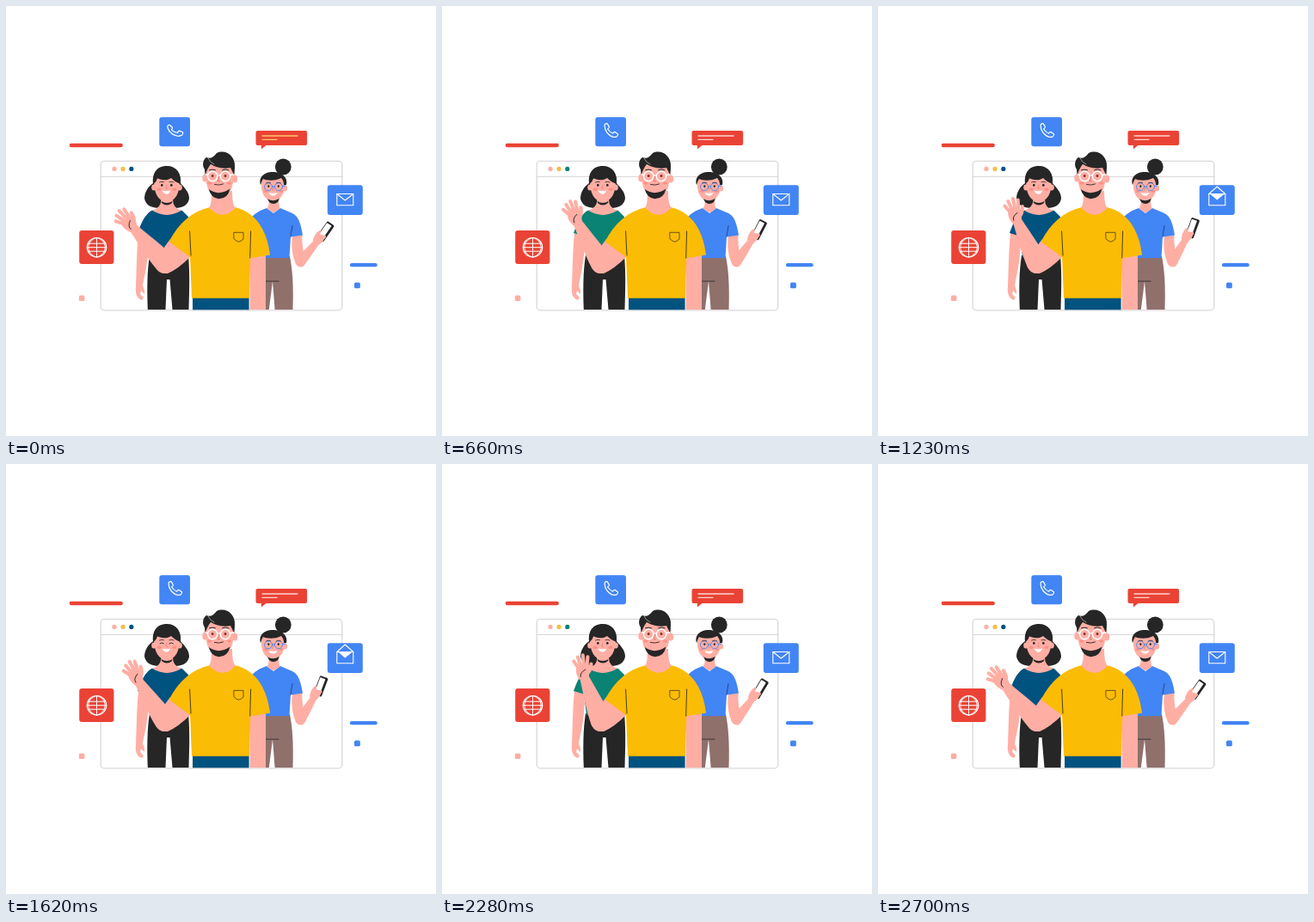
Recreate the animation shown at these times as an HTML page with a canvas. Size 500 px wide and 500 px high, loop 2730 ms.

```html
<!DOCTYPE html>
<html lang="en">
<head>
<meta charset="utf-8">
<title>Team greeting</title>
<style>
html, body { margin: 0; width: 100%; height: 100%; overflow: hidden; background: #fff; }
canvas { display: block; width: 500px; height: 500px; }
</style>
</head>
<body>
<canvas id="stage" width="500" height="500"></canvas>
<script>
const ctx = document.getElementById('stage').getContext('2d');
const LOOP = 2730;
const TAU = Math.PI * 2;
const RED = '#ea4335', BLUE = '#4285f4', YELLOW = '#fbbc05', NAVY = '#00527f', TEAL = '#0a8375';
const SKIN = '#ffaea4', INK = '#262626', BROWN = '#8f706b', GREY = '#dcd8da', BLUSH = '#ff8f86';

const clamp = v => Math.max(0, Math.min(1, v));
const ease = v => { v = clamp(v); return v * v * (3 - 2 * v); };
const mix = (a, b, k) => a + (b - a) * k;
const sway = (t, period) => (1 - Math.cos(TAU * t / period)) / 2;
const within = (t, a, b) => t >= a && t < b;

function fill(d, color) {
  ctx.fillStyle = color;
  ctx.fill(new Path2D(d));
}
function line(d, color, width = 1) {
  ctx.strokeStyle = color;
  ctx.lineWidth = width;
  ctx.stroke(new Path2D(d));
}
function oval(x, y, rx, ry, color) {
  ctx.beginPath();
  ctx.ellipse(x, y, rx, ry, 0, 0, TAU);
  ctx.fillStyle = color;
  ctx.fill();
}
function ring(x, y, r, color, width = 1) {
  ctx.beginPath();
  ctx.arc(x, y, r, 0, TAU);
  ctx.strokeStyle = color;
  ctx.lineWidth = width;
  ctx.stroke();
}
function box(x, y, w, h, r, color) {
  ctx.beginPath();
  ctx.roundRect(x, y, w, h, r);
  ctx.fillStyle = color;
  ctx.fill();
}
function at(x, y, degrees, draw) {
  ctx.save();
  ctx.translate(x, y);
  ctx.rotate(degrees * Math.PI / 180);
  draw();
  ctx.restore();
}

function drawWindow(accent) {
  ctx.beginPath();
  ctx.roundRect(110.2, 180.3, 280.5, 173.5, 4);
  ctx.strokeStyle = GREY;
  ctx.lineWidth = 1.3;
  ctx.stroke();
  line('M110 198.5H391', GREY, 1.2);
  oval(126, 189.4, 2.6, 2.6, SKIN);
  oval(136, 189.4, 2.6, 2.6, '#f2bf49');
  oval(145.8, 189.4, 2.6, 2.6, accent);
}

function drawPhoneTile(t) {
  box(178.3, 129.2, 35.7, 34, 3, BLUE);
  const ringing = -16 * Math.cos(TAU * t / 240) * clamp(1 - t / 570);
  at(196.6, 144.5, ringing, () => line(
    'M-7.5-5Q-7.6-8-4.6-7.8L-2.2-4.2Q-2-3-4-1.5Q-1.8 2 2 3.7Q3.2 1.7 4.6 2L8 4.6' +
    'Q8.2 6 6.2 7.6Q1 9.3-4.5 3Q-7.5-1-7.5-5Z', '#fff', 1.2));
}

function drawMailTile(t) {
  box(373.8, 208.2, 41, 34.8, 3, BLUE);
  const open = ease((t - 950) / 160) * (1 - ease((t - 1950) / 160));
  const tip = mix(226, 210, open);
  if (open > 0.5) fill('M386 218.5L394.3 225.5 402.8 218.5Z', '#fff');
  line('M384.8 218.5H403.8V231.8H384.8Z', '#fff', 1.1);
  line(`M384.8 218.5L394.3 ${tip} 403.8 218.5`, '#fff', 1.1);
}

function drawGlobeTile(t) {
  box(85.2, 261, 40.2, 39, 3, RED);
  const r = 11.2, turn = 120 * clamp(t / 570);
  ctx.save();
  ctx.translate(105.5, 280.7);
  ring(0, 0, r, '#fff', 1.2);
  for (let i = 0; i < 3; i++) {
    const lon = (30 + i * 60 + turn) % 180 - 90;
    const bulge = r * Math.sin(lon * Math.PI / 180) * 4 / 3;
    line(`M0 ${-r}C${bulge} ${-r * 0.75} ${bulge} ${r * 0.75} 0 ${r}`, '#fff');
  }
  line('M-10.2-4.5H10.2M-11.2 0H11.2M-10.2 4.5H10.2', '#fff');
  ctx.restore();
}

function drawBubble(t) {
  box(290.5, 145, 59.6, 17, 2, RED);
  fill('M296.8 161V166.6L303 161.5Z', RED);
  const ink = t < 30 ? '#ffc66b' : '#ffd5cf';
  line('M298 151H339', ink, 1.3);
  line('M298 155.3H315', ink, 1.3);
}

function drawAccents() {
  line('M76 162H133.6', RED, 4.6);
  line('M402 301.2H429.6', BLUE, 4.2);
  box(84.8, 336.6, 6.6, 6.4, 1.5, SKIN);
  box(405, 321.6, 6.8, 6.6, 1.5, BLUE);
}

function drawLeftWoman(t, shirt) {
  fill('M187 186C174 186 170 196 171 206C165 210 161 217 161 224C163 234 173 236 185 234.5' +
    'C200 236 211 235 213 224C213 216 207 211 203 206C204 194 198 186 187 186Z', INK);
  fill('M154 264C152 284 152 300 151 326C150 334 152 340 158 342L160 339L156 335L157 331' +
    'L161 335C162 330 159 327 159 324C164 302 166 290 166 264Z', SKIN);
  fill('M167 290H212C214 312 213 334 212.5 353H193.5L190.5 318H187L185.5 353H164.8C164 330 164 308 167 290Z', INK);
  fill('M169 238C161 243 157 253 153 264L165 267.5L168 292H212V245L205 238Q187 234 169 238Z', shirt);
  fill('M170 237.8Q180 235 180.5 225H194Q194 235 204 237.8Q187 248 170 237.8Z', SKIN);
  oval(172, 211, 2.8, 3.5, SKIN);
  oval(202, 211, 2.8, 3.5, SKIN);
  fill('M172 203Q172 226 187 228Q202 226 202 203Q194 197 187 199Q179 198 172 203Z', SKIN);
  fill('M180.5 227Q187 231 193.5 227L193 229Q187 234 181 229Z', INK);
  fill('M171 207C171 192 177 187 187 187C198 187 204 195 203 207C198 205 195 203 192 200C187 204 178 202 176 200Q175 205 171 207Z', INK);
  oval(178, 213.2, 2.5, 1.7, BLUSH);
  oval(196, 213.2, 2.5, 1.7, BLUSH);
  if (within(t, 1560, 1710)) {
    line('M179 208.8Q181.3 206.8 183.5 208.8M190 208.8Q192.3 206.8 194.5 208.8', INK, 0.9);
  } else {
    oval(181.3, 208.3, 1.3, 1.5, INK);
    oval(192.3, 208.3, 1.3, 1.5, INK);
  }
  line('M178.5 205Q181 203.5 183.5 204.7M190 204.7Q193 203.5 195 205', INK, 0.8);
  line('M187 208L185.7 212L187.5 212.3', '#e5786f', 0.7);
  fill('M181.5 214.5Q186.5 216 191 214.5Q190 218.7 186.5 218.7Q183 218.5 181.5 214.5Z', '#fff');
}

function drawPhoneArm(t) {
  const lift = sway(t, LOOP);
  fill('M333 267L344.5 266C344 273 345 281 346 286L349 298Q346 303 340 301.5C334 299 331 281 333 267Z', SKIN);
  at(342, 297, mix(39.6, 30.5, lift), () => {
    fill('M-5.5 1C-5-10-4-21-3-30L4-30C5-20 6-10 6.5 1A6 5 0 0 1-5.5 1Z', SKIN);
    at(0, -45.4, mix(-5, -11, lift), () => {
      box(-4.5, -11.5, 10, 23, 1.5, INK);
      box(-3.7, -9.6, 6.4, 17.5, 0.7, '#fff');
    });
    fill('M-4-28C-7-34-7-40-5-43Q-3-44-2.5-39L4-42Q6-41 5-38C6-36 5-31 4-28Z', SKIN);
  });
}

function drawRightWoman(t) {
  drawPhoneArm(t);
  fill('M300 291H330C333 306 334.5 324 333.5 353H312.6L310 320L305.8 353H300Z', BROWN);
  line('M302.5 320H317', INK, 0.8);
  fill('M303 235C294 238 288 242 284 248V293H329.5L331 268.5L345 266.5C343 255 341 245 333 241L319 235L311 241Z', BLUE);
  line('M333 255.5L331 268', '#243a66', 0.8);
  fill('M303 235.2Q306 234 306 224H317Q317 234 319 235.2L311 240.5Z', SKIN);
  oval(322.3, 187, 9.4, 9.4, INK);
  oval(324.5, 212, 2.6, 3.5, SKIN);
  fill('M296.5 202Q296 226 310.5 227Q325 225 324.5 202Q311 194 296.5 202Z', SKIN);
  fill('M304 224.2Q311 228.5 318 223.8L316 228Q311 232 306 228Z', INK);
  fill('M296 208C293 198 302 192 312 193C322 194 328 200 326 208L323 208Q323 203 320 200C312 204 303 203 299 201Q297 204 296 208Z', INK);
  oval(301.8, 215.6, 2.3, 1.4, BLUSH);
  oval(320, 215.6, 2.3, 1.4, BLUSH);
  ring(305, 210.3, 4.5, BLUE, 0.9);
  ring(317, 210.3, 4.5, BLUE, 0.9);
  line('M309.5 210Q311 209 312.5 210M321.5 209.3L325 209', BLUE, 0.9);
  oval(305.3, 209.6, 1.1, 1.3, INK);
  oval(316.8, 209.6, 1.1, 1.3, INK);
  line('M302.5 205.8Q305 204.5 307.5 205.6M314.5 205.6Q317 204.5 319.5 205.8', INK, 0.7);
  line('M311 210.5L310 214.5', '#e5786f', 0.7);
  fill('M305.5 217Q311 218.5 315.5 217Q314 220.7 310.5 220.6Q307 220.5 305.5 217Z', '#fff');
}

function drawHand(turn) {
  at(0, -58, turn, () => {
    fill('M-5 5C-8 0-9-6-7-11Q0-16 7-11Q9-3 5 5Z', SKIN);
    line('M-5.5-9L-10-16.5M-2.5-11L-5-21M1.5-11L1-23M5-10L6.5-20.5', SKIN, 4);
    line('M4-1Q9-4 10-12', SKIN, 4.2);
    line('M-3 2Q-4-3 3-6', INK, 0.9);
  });
}

function drawWavingArm(t) {
  const raise = sway(t, 910);
  fill('M191 271L215 291Q200 306 188 311Q176 312 173 301Q180 285 191 271Z', SKIN);
  at(184.5, 299.5, mix(-41.5, -20.5, raise), () => {
    fill('M-11.5 0C-11-20-7-40-4.5-60H4.8C7-44 11-22 13-6Q12 8 2 11.5Q-10 12-11.5 0Z', SKIN);
    drawHand(mix(0, 17, raise));
  });
}

function drawMan(t) {
  drawWavingArm(t);
  fill('M284 290H302V353H283.5Z', SKIN);
  box(217, 339, 65.6, 14.2, 0, NAVY);
  fill('M237 234C216 239 201 252 189.5 274L214 292L216 339.7H283L284.3 293.3L307 289.5C304 263 292 240 266 234Z', YELLOW);
  line('M213.6 262L215 290M284.6 262L283.7 293', '#3a3014', 0.9);
  line('M265.2 263.3H276V271Q273 273.8 270.6 274.2Q268 273.7 265.2 271Z', '#5d4915', 0.9);
  fill('M236 234.5Q239 232 239 215H263Q263 232 267 234.5Q252 251 236 234.5Z', SKIN);
  oval(231.5, 200, 3.2, 4.6, SKIN);
  oval(266, 201, 3.2, 4.6, SKIN);
  fill('M232.5 186Q231 211 238 217Q249 227 259 217Q266 211 264.5 186Q248 179 232.5 186Z', SKIN);
  fill('M235.8 213Q247 221.5 260.5 212.5Q258 224 247.5 224.3Q238 223 235.8 213Z', INK);
  fill('M231.5 197L231 190C228 186 228.5 179 233 176C238 178 241 176 245 171C255 166 267 174 266 187L265.5 197' +
    'Q263 192 261 188C252 190 243 187 238 184Q234 189 231.5 197Z', INK);
  line('M235 177Q237 182 242 184', '#fff', 0.5);
  oval(236.8, 206, 2.7, 1.6, BLUSH);
  oval(259.5, 206, 2.7, 1.6, BLUSH);
  for (const x of [240.2, 255]) {
    ring(x, 198, 5.7, '#fff', 1.5);
    oval(x, 197.5, 1.4, 1.6, '#7d2d2b');
  }
  line('M246 197.5Q247.6 196.3 249.2 197.5M234.5 196.5L232 196M260.7 196.5L265 196', '#fff', 1.3);
  line('M236.5 190.8Q240 189.2 243.5 190.8M251.5 190.8Q255 189.2 259 190.8', INK, 1);
  line('M248 198L246.2 203.5L248.5 204', '#d8685f', 0.8);
  line('M242.5 207.5Q247.5 209 252.5 207', INK, 0.9);
}

function render(t) {
  ctx.fillStyle = '#fff';
  ctx.fillRect(0, 0, 500, 500);
  const accent = within(t, 570, 930) || within(t, 2130, 2460) ? TEAL : NAVY;
  drawWindow(accent);
  drawAccents();
  drawPhoneTile(t);
  drawMailTile(t);
  drawGlobeTile(t);
  drawBubble(t);
  drawLeftWoman(t, accent);
  drawRightWoman(t);
  drawMan(t);
}

ctx.lineCap = 'round';
ctx.lineJoin = 'round';
const start = performance.now();
function tick() {
  render((performance.now() - start) % LOOP);
  requestAnimationFrame(tick);
}
tick();
</script>
</body>
</html>
```
